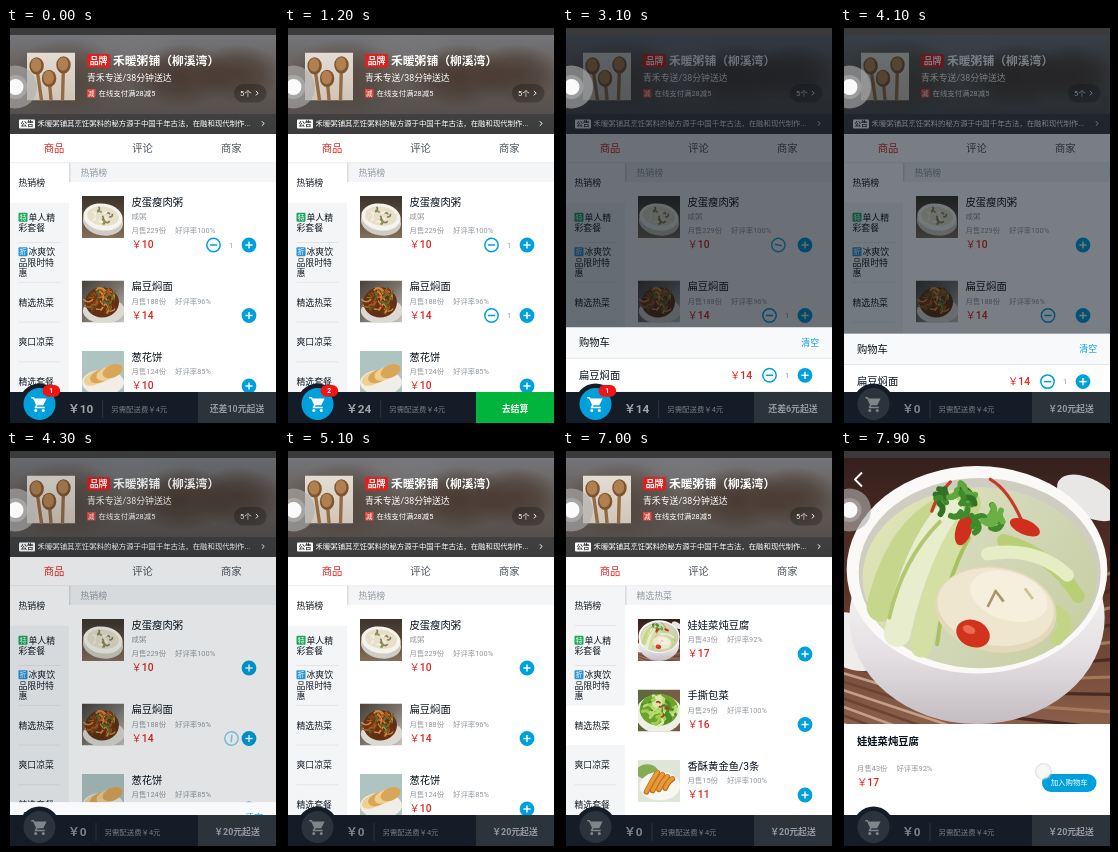
These frames come from a looping animation (272x395 px, 8000 ms). An HTML page with a canvas:

```html
<!DOCTYPE html>
<html lang="zh">
<head>
<meta charset="utf-8">
<title>点餐</title>
<style>
html, body { margin: 0; width: 100%; height: 100%; overflow: hidden; background: #000; }
canvas { display: block; width: 272px; height: 395px; }
</style>
</head>
<body>
<canvas id="stage"></canvas>
<script>
const W = 272, H = 395, LOOP = 8000;
const L = 4, R = 270, TOP = 7, LIST = 135, BAR = 364;
const BLUE = '#00a0dc', RED = '#e0241f', INK = '#07111b', GREY = '#93999f', PALE = '#f3f5f7';
const FONT = 'Roboto, "Noto Sans CJK SC", "Noto Sans CJK", sans-serif';

// Moments of each action, in ms
const ADD = 650, OPEN = 1650, REMOVE = 3000, CLOSE = 4050, CLEAR = 4095,
  SCROLL = 5555, DETAIL = 7200, TOUCH = 7900;

const canvas = document.getElementById('stage');
const dpr = window.devicePixelRatio || 1;
canvas.width = W * dpr;
canvas.height = H * dpr;
const c = canvas.getContext('2d');

const clamp = v => Math.max(0, Math.min(1, v));
const phase = (t, start, ms) => clamp((t - start) / ms);
const smooth = p => p * p * (3 - 2 * p);

function bezier(x1, y1, x2, y2) {
  const at = (a, b, u) => 3 * a * u * (1 - u) ** 2 + 3 * b * u * u * (1 - u) + u ** 3;
  return x => {
    let lo = 0, hi = 1;
    for (let i = 0; i < 24; i++) {
      const mid = (lo + hi) / 2;
      if (at(x1, x2, mid) < x) lo = mid; else hi = mid;
    }
    return at(y1, y2, lo);
  };
}
const ease = bezier(.25, .1, .25, 1);
const toss = bezier(.49, -.29, .75, .41);

// Drawing helpers
function rect(x, y, w, h, fill) { c.fillStyle = fill; c.fillRect(x, y, w, h); }
function pill(x, y, w, h, r, fill) {
  c.fillStyle = fill;
  c.beginPath(); c.roundRect(x, y, w, h, r); c.fill();
}
function oval(x, y, rx, ry, fill, turn = 0) {
  c.fillStyle = fill;
  c.beginPath(); c.ellipse(x, y, rx, ry, turn, 0, 7); c.fill();
}
const dot = (x, y, r, fill) => oval(x, y, r, r, fill);
function shade(x0, y0, x1, y1, ...colors) {
  const g = c.createLinearGradient(x0, y0, x1, y1);
  colors.forEach((color, i) => g.addColorStop(i / (colors.length - 1), color));
  return g;
}
// Soft round patch; rgb is "r,g,b"
function glow(x, y, rx, ry, rgb, alpha) {
  c.save();
  c.translate(x, y);
  c.scale(rx, ry);
  const g = c.createRadialGradient(0, 0, 0, 0, 0, 1);
  g.addColorStop(0, `rgba(${rgb},${alpha})`);
  g.addColorStop(.5, `rgba(${rgb},${alpha * .7})`);
  g.addColorStop(1, `rgba(${rgb},0)`);
  dot(0, 0, 1, g);
  c.restore();
}
function line(pts, color, width, cap = 'butt') {
  c.strokeStyle = color; c.lineWidth = width; c.lineCap = cap; c.lineJoin = 'round';
  c.beginPath();
  pts.forEach(([x, y]) => c.lineTo(x, y));
  c.stroke();
}
function curve(x0, y0, x1, y1, x2, y2, color, width) {
  c.strokeStyle = color; c.lineWidth = width; c.lineCap = 'round';
  c.beginPath(); c.moveTo(x0, y0); c.quadraticCurveTo(x1, y1, x2, y2); c.stroke();
}
// y is the visual middle; returns the width
function text(s, x, y, size, color, weight = 400, align = 'left') {
  c.font = `${weight} ${size}px ${FONT}`;
  c.textAlign = align;
  c.fillStyle = color;
  c.fillText(s, x, y + size * .37);
  return c.measureText(s).width;
}
function clipped(x, y, w, h, draw) {
  c.save();
  c.beginPath(); c.rect(x, y, w, h); c.clip();
  draw();
  c.restore();
}
function random(seed) {
  return () => (seed = (seed * 16807) % 2147483647) / 2147483647;
}

// Dish pictures, drawn in a 100 x 100 box
function strips(seed, n, colors, cx, cy, spread, len, width) {
  const rnd = random(seed);
  for (let i = 0; i < n; i++) {
    const a = rnd() * 6.28, d = Math.sqrt(rnd()) * spread;
    const x = cx + Math.cos(a) * d, y = cy + Math.sin(a) * d * .8;
    const b = rnd() * 3.14, dx = Math.cos(b) * len, dy = Math.sin(b) * len;
    curve(x - dx, y - dy, x + dy, y - dx, x + dx, y + dy, colors[i % colors.length], width);
  }
}
const pictures = {
  porridge() {
    rect(0, 0, 100, 100, shade(0, 0, 0, 100, '#3b342c', '#5d4b3b', '#84705a'));
    oval(50, 62, 48, 32, '#cfccc5', .15);
    oval(50, 50, 47, 32, '#f6f3ec', .15);
    oval(50, 48, 38, 23, '#e6dfca', .15);
    strips(5, 14, ['#8a7a55', '#f7f2df', '#7f9650'], 50, 47, 24, 4, 4);
  },
  noodles() {
    rect(0, 0, 100, 100, shade(0, 0, 100, 100, '#47413c', '#77716a', '#c9c5be'));
    oval(52, 72, 50, 30, '#dcd9d3');
    oval(48, 52, 40, 36, '#5f3014');
    strips(9, 44, ['#a8591f', '#d08a3a', '#7a3312', '#5c6a2c'], 48, 50, 34, 11, 3.5);
  },
  pancake() {
    rect(0, 0, 100, 100, '#aec4c0');
    oval(50, 75, 50, 30, '#f0eee6');
    for (let i = 0; i < 4; i++) oval(28 + i * 15, 66 - i * 6, 25, 15, i % 2 ? '#d9a658' : '#efcf92', -.4);
  },
  juice() {
    rect(0, 0, 100, 100, '#fdfcf9');
    pill(30, 22, 27, 64, 8, '#f09a1d');
    rect(35, 6, 17, 18, '#e7e3d8');
    rect(35, 22, 17, 8, '#d98314');
    dot(70, 76, 14, '#ee8b12');
    dot(86, 82, 11, '#f5a623');
    oval(56, 88, 12, 8, '#f7bd4a');
    oval(72, 60, 9, 3, '#7aa343', -.6);
  },
  cabbage() {
    rect(0, 0, 100, 100, shade(0, 0, 100, 0, '#5b6b3c', '#7d5a45'));
    oval(50, 58, 56, 46, '#eef0e6');
    oval(50, 48, 46, 38, '#6ba32c');
    strips(21, 40, ['#a0cf52', '#d8e9a8', '#4f8a26', '#b5dc72'], 50, 48, 37, 10, 7);
    strips(4, 4, ['#b3322a'], 50, 46, 26, 4, 4);
  },
  fish() {
    rect(0, 0, 100, 100, '#dfe5d8');
    oval(22, 28, 26, 18, '#86ab55');
    oval(52, 62, 48, 34, '#f8f7f2');
    for (let i = 0; i < 4; i++) {
      curve(20 + i * 15, 76 - i * 3, 32 + i * 13, 52, 46 + i * 12, 30 + i * 5, '#b96a1b', 13);
      curve(20 + i * 15, 75 - i * 3, 32 + i * 13, 51, 46 + i * 12, 29 + i * 5, '#e79a37', 9);
    }
  },
  tofu() {
    rect(0, 0, 100, 100, shade(0, 0, 0, 100, '#35201d', '#5c3327', '#8a5f4a'));
    for (let i = 0; i < 18; i++) {
      line([[50, 60 + i * 4], [110, 40 + i * 7]], i % 2 ? '#4a2a22' : '#a5785c', 1.2);
      line([[50, 80 + i * 4], [-10, 66 + i * 3]], i % 2 ? '#6b4434' : '#c3a08a', 1);
    }
    // Handles and body
    oval(92, 15, 13, 7, '#e9e6e6', .5);
    oval(3, 69, 14, 10, '#efecec', .5);
    oval(50, 60, 48, 40, shade(0, 50, 0, 100, '#f4f1f2', '#e3dfe2', '#c3bcc0'));
    // Rim and soup
    oval(50, 42, 49, 39, '#fbf9f8');
    oval(51, 43, 45.5, 35.5, '#cfcdc2');
    oval(51, 45, 44, 34, shade(15, 20, 85, 70, '#dfe5b4', '#d2d7b8', '#c9cfa4'));
    // Leaves
    curve(46, 17, 22, 22, 14, 56, '#c7d68d', 11);
    curve(40, 20, 27, 34, 20, 66, '#e8edcd', 10);
    curve(45, 26, 35, 40, 29, 71, '#d3dfa3', 8);
    curve(36, 24, 22, 38, 17, 60, '#b2c76f', 1.5);
    curve(47, 30, 38, 46, 35, 70, '#a9c15f', 1.5);
    curve(60, 31, 78, 36, 88, 52, '#b9cf76', 5);
    curve(54, 36, 72, 33, 84, 44, '#e6ecc4', 5);
    curve(80, 58, 86, 62, 80, 68, '#c3d584', 5);
    // Tofu
    oval(57, 57, 23, 16, '#e3d9ba', .15);
    oval(57, 56, 22, 14.5, '#efe6cf', .15);
    oval(62, 52, 15, 9, '#f6efdd', .3);
    line([[54, 56], [57, 50], [60, 54]], '#a99668', 1);
    line([[68, 49], [71, 53]], '#cdbf98', 1);
    // Garnish
    curve(40, 9, 35, 14, 33, 20, '#c73a26', 1.2);
    curve(55, 8, 62, 12, 67, 24, '#c73a26', 1.2);
    oval(45, 27, 3, 6, '#cf2f1c', .3);
    oval(68, 26, 6, 2.8, '#cf2f1c', .4);
    oval(48.5, 66, 6.5, 5, '#d2331d', .4);
    oval(47, 64.5, 2.5, 1.5, '#ea6a52', .4);
    strips(13, 16, ['#3f8a2c', '#5fa63d', '#2f7323'], 41, 16, 7, 2, 2.2);
    strips(17, 12, ['#3f8a2c', '#6bb045'], 54, 23, 6, 2, 2.2);
  },
  spoons() {
    rect(0, 0, 100, 100, shade(0, 0, 0, 100, '#e4ddd4', '#cfc5b8'));
    [[20, 28], [46, 54], [76, 26]].forEach(([x, y], i) => {
      line([[x, y], [x + 10 - i * 6, 98]], '#946a42', 7, 'round');
      oval(x, y, 15, 18, '#7f5530');
      oval(x - 1, y - 2, 11, 14, '#b08050');
    });
  }
};
function picture(kind, x, y, size) {
  clipped(x, y, size, size, () => {
    c.translate(x, y);
    c.scale(size / 100, size / 100);
    pictures[kind]();
  });
}

// Menu data: name, picture, sold, rating, price, extra
const groups = [
  ['热销榜', [
    ['皮蛋瘦肉粥', 'porridge', 229, 100, 10, { desc: '咸粥' }],
    ['扁豆焖面', 'noodles', 188, 96, 14],
    ['葱花饼', 'pancake', 124, 85, 10],
    ['牛肉馅饼', 'pancake', 114, 91, 14],
    ['猪肉锅贴', 'fish', 101, 78, 17],
    ['南瓜粥', 'porridge', 81, 91, 9],
    ['红豆薏米粥', 'porridge', 81, 86, 12],
    ['八宝酱菜', 'cabbage', 84, 100, 4],
    ['糊塌子', 'pancake', 80, 93, 10]]],
  ['单人精彩套餐', [['红枣山药粥套餐', 'porridge', 17, 100, 29]]],
  ['冰爽饮品限时特惠', [['VC无限橙果汁', 'juice', 15, 100, 8, { old: 10 }]]],
  ['精选热菜', [
    ['娃娃菜炖豆腐', 'tofu', 43, 92, 17],
    ['手撕包菜', 'cabbage', 29, 100, 16],
    ['香酥黄金鱼/3条', 'fish', 15, 100, 11]]]
];
const rowHeight = item => item[5] && item[5].desc ? 84.5 : 70.5;
const tops = [0];
groups.forEach(([, items], i) => {
  tops.push(tops[i] + 20.5 + items.reduce((sum, it) => sum + rowHeight(it), 0));
});

const menu = [['热销榜'], ['单人精', '彩套餐'], ['冰爽饮', '品限时特', '惠'], ['精选热菜'], ['爽口凉菜'], ['精选套餐']];
const tags = { 1: ['特', '#19a85b'], 2: ['折', '#2a94d6'] };

// Controls
function plus(x, y) {
  dot(x, y, 7.4, BLUE);
  line([[x - 3.6, y], [x + 3.6, y]], '#fff', 1.4);
  line([[x, y - 3.6], [x, y + 3.6]], '#fff', 1.4);
}
// p: 0 in place, 1 rolled away behind the plus
function minus(x, y, p = 0) {
  if (p >= 1) return;
  c.save();
  c.globalAlpha *= 1 - smooth(p);
  c.translate(x + 35 * p, y);
  c.rotate(Math.PI * smooth(smooth(p)));
  c.strokeStyle = BLUE; c.lineWidth = 1.5;
  c.beginPath(); c.arc(0, 0, 6.7, 0, 7); c.stroke();
  line([[-3.6, 0], [3.6, 0]], BLUE, 1.5);
  c.restore();
}
function stepper(y, hidden) {
  minus(207.5, y, hidden);
  if (hidden === 0) text('1', 225, y, 7.4, GREY, 400, 'center');
  plus(243, y);
}
function chevron(x, y, s, width) {
  line([[x - s / 2, y - s], [x + s / 2, y], [x - s / 2, y + s]], '#fff', width);
}
function stats(x, y, sold, rate) {
  const w = text(`月售${sold}份`, x, y, 7.4, GREY);
  text(`好评率${rate}%`, x + w + 8.9, y, 7.4, GREY);
}

function header() {
  clipped(L, TOP, R - L, 99, () => {
    rect(L, TOP, R - L, 99, shade(0, TOP, 0, 106, '#74757a', '#68625e', '#5a5451', '#4e4a49'));
    glow(60, 50, 60, 40, '74,58,46', .6);
    glow(175, 48, 55, 32, '64,46,36', .75);
    glow(232, 46, 45, 30, '64,46,36', .7);
    glow(125, 18, 50, 18, '125,125,128', .5);
  });
  picture('spoons', 21, 24.5, 48);
  pill(81, 26, 23, 13.5, 1.5, '#e0201c');
  text('品牌', 92.5, 32.8, 8.9, '#fff', 700, 'center');
  text('禾暖粥铺（柳溪湾）', 107, 32.5, 11.8, '#fff', 700);
  text('青禾专送/38分钟送达', 81, 49.5, 8.9, '#fff');
  rect(81, 61, 8.5, 8.5, '#d9483f');
  text('减', 85.2, 65.2, 6.4, '#fff', 400, 'center');
  text('在线支付满28减5', 92.5, 65.2, 7.4, '#fff');
  pill(228, 56, 32.5, 18.5, 9.2, 'rgba(0,0,0,.25)');
  text('5个', 234, 65.2, 7.4, '#fff');
  chevron(251, 65.2, 2.2, 1);
  rect(L, 86, R - L, 20, 'rgba(7,17,27,.25)');
  pill(13, 91.5, 16, 9, 1, '#fff');
  text('公告', 21, 96, 6.6, '#333', 700, 'center');
  text('禾暖粥铺其烹饪粥料的秘方源于中国千年古法，在融和现代制作...', 31.5, 95.5, 7.4, '#fff');
  chevron(257, 95.5, 2.2, 1);
}

function tabs() {
  rect(L, 106, R - L, 29, '#fff');
  ['商品', '评论', '商家'].forEach((s, i) => {
    text(s, 48 + i * 88.6, 120.5, 10.3, i ? '#4d555d' : RED, 400, 'center');
  });
  rect(L, 134.4, R - L, .7, 'rgba(7,17,27,.1)');
}

function sidebar(scroll) {
  let current = 0;
  while (current < 3 && scroll >= tops[current + 1] - .5) current++;
  rect(L, LIST, 59, BAR - LIST, PALE);
  menu.forEach((lines, i) => {
    const y = LIST + i * 39.8, mid = y + 19.9;
    if (i === current) rect(L, y, 59, 39.8, '#fff');
    else if (i + 1 !== current) rect(12.5, y + 39.3, 42, .7, 'rgba(7,17,27,.1)');
    lines.forEach((s, k) => {
      const ly = mid + (k - (lines.length - 1) / 2) * 10.35;
      let x = 12.5;
      if (!k && tags[i]) {
        pill(x, ly - 4.8, 9, 9, 1, tags[i][1]);
        text(tags[i][0], x + 4.5, ly - .3, 7, '#fff', 500, 'center');
        x += 10;
      }
      text(s, x, ly, 8.9, '#141c24');
    });
  });
}

function dish(item, y, hidden) {
  const [name, kind, sold, rate, price, extra = {}] = item;
  const shift = extra.desc ? 14 : 0;
  picture(kind, 76, y - 6, 42);
  text(name, 125.5, y, 10.3, INK);
  if (extra.desc) text(extra.desc, 125.5, y + 14.5, 7.4, GREY);
  stats(125.5, y + 14.5 + shift, sold, rate);
  const w = text('￥' + price, 125.5, y + 28.5 + shift, 10.3, RED, 500);
  if (extra.old) {
    const ow = text('￥' + extra.old, 125.5 + w + 4, y + 29 + shift, 7.4, GREY);
    rect(125.5 + w + 5, y + 29 + shift, ow - 1, .8, GREY);
  }
  stepper(y + 29 + shift, hidden);
}

function list(t, scroll) {
  rect(63, LIST, R - 63, BAR - LIST, '#fff');
  groups.forEach(([title, items], gi) => {
    let y = LIST + tops[gi] - scroll;
    rect(63, y, R - 63, 19, PALE);
    rect(63, y, 1.5, 19, '#d9dde1');
    text(title, 74.5, y + 10, 8.9, GREY);
    y += 19;
    items.forEach((item, i) => {
      let hidden = 1;
      if (gi === 0 && i === 0) hidden = phase(t, REMOVE, 400);
      if (gi === 0 && i === 1) hidden = t < CLEAR ? 1 - phase(t, ADD, 400) : phase(t, CLEAR, 400);
      if (y > 30 && y < BAR) dish(item, y + 20, hidden);
      y += rowHeight(item);
    });
  });
}

function sheet(t) {
  const open = ease(phase(t, OPEN, 500)) * (1 - ease(phase(t, CLOSE, 500)));
  if (open <= 0) return;
  rect(L, TOP, R - L, BAR - TOP, `rgba(7,17,27,${.6 * open})`);
  const rows = groups[0][1].slice(t < REMOVE ? 0 : 1, 2);
  const height = 31 + rows.length * 33.5;
  const y = BAR - height * open;
  clipped(L, TOP, R - L, BAR - TOP, () => {
    rect(L, y, R - L, height, '#fff');
    rect(L, y, R - L, 31, '#f7f9fa');
    rect(L, y + 30.4, R - L, .7, 'rgba(7,17,27,.12)');
    text('购物车', 17, y + 15, 10.3, INK);
    text('清空', 257, y + 15, 8.9, BLUE, 400, 'right');
    rows.forEach((item, i) => {
      const mid = y + 47.8 + i * 33.5;
      text(item[0], 17, mid, 10.3, INK);
      text('￥' + item[4], 190, mid, 10.3, RED, 500, 'right');
      stepper(mid, 0);
      rect(17, mid + 16.2, 240, .6, 'rgba(7,17,27,.1)');
    });
  });
}

function detail(t) {
  const p = phase(t, DETAIL, 250);
  if (p <= 0) return;
  clipped(L, TOP, R - L, BAR - TOP, () => {
    c.translate((R - L) * (1 - p), 0);
    rect(L, TOP, R - L, BAR - TOP, '#fff');
    picture('tofu', L, TOP, 266);
    line([[22, 21.5], [15, 28.5], [22, 35.5]], '#fff', 1.8);
    text('娃娃菜炖豆腐', 17, 290.5, 10.3, INK, 700);
    stats(17, 317.5, 43, 92);
    text('￥17', 17, 331.5, 10.3, RED, 500);
    pill(202, 323, 54.5, 18, 9, BLUE);
    text('加入购物车', 229.2, 331.7, 7.4, '#fff', 400, 'center');
    if (t >= TOUCH) {
      dot(203.5, 320.5, 8.5, 'rgba(200,204,206,.5)');
      dot(203.5, 320.5, 7, 'rgba(250,250,250,.85)');
    }
  });
}

function cartIcon(x, y, color) {
  c.save();
  c.translate(x - 9, y - 9);
  c.scale(.75, .75);
  line([[1, 3], [4, 3], [8.5, 12.5], [6.5, 16], [19, 16]], color, 2);
  c.fillStyle = color;
  c.beginPath();
  [[5, 4], [21.5, 4], [17, 13], [8.5, 13]].forEach(([px, py]) => c.lineTo(px, py));
  c.fill();
  dot(7, 20, 2, color);
  dot(17, 20, 2, color);
  c.restore();
}

function bar(t) {
  const items = [t < REMOVE, t >= ADD && t < CLEAR];
  const count = items[0] + items[1];
  const total = items[0] * 10 + items[1] * 14;
  rect(L, BAR, R - L, H - BAR, '#141d27');
  dot(33.5, 376, 20.5, '#141d27');
  dot(33.5, 376, 16, count ? BLUE : '#2b343c');
  cartIcon(33.5, 376.5, count ? '#fff' : '#80858a');
  if (count) {
    pill(36.5, 357, 17.7, 11.8, 5.9, '#f01414');
    text(count, 45.3, 362.8, 6.8, '#fff', 700, 'center');
  }
  const w = text('￥' + total, 62, 381, 11.8, `rgba(255,255,255,${count ? .6 : .45})`, 700);
  const x = 62 + w + 9;
  rect(x, 372, .8, 18, 'rgba(255,255,255,.13)');
  text('另需配送费￥4元', x + 9, 381, 7.4, 'rgba(255,255,255,.42)');
  const ready = total >= 20;
  const label = ready ? '去结算' : total ? `还差${20 - total}元起送` : '￥20元起送';
  rect(192, BAR, R - 192, H - BAR, ready ? '#00b43c' : '#2b333b');
  text(label, 231, 381, 8.9, ready ? '#fff' : 'rgba(255,255,255,.5)', 700, 'center');
}

function ball(t) {
  const p = phase(t, ADD, 400);
  if (p <= 0 || p >= 1) return;
  dot(243 - 209.5 * p, 288 + 88 * toss(p), 6, BLUE);
}

function floatButton() {
  clipped(L, 0, R - L, H, () => {
    dot(9.5, 59, 21.5, 'rgba(175,175,175,.62)');
    dot(9.5, 59, 12, 'rgba(215,215,215,.35)');
    dot(9.5, 59, 8, 'rgba(255,255,255,.95)');
  });
}

function draw(t) {
  const scroll = tops[3] * (1 - (1 - phase(t, SCROLL, 300)) ** 4);
  c.setTransform(dpr, 0, 0, dpr, 0, 0);
  rect(0, 0, W, H, '#000');
  clipped(L, LIST, R - L, BAR - LIST, () => {
    list(t, scroll);
    sidebar(scroll);
  });
  header();
  tabs();
  sheet(t);
  detail(t);
  rect(L, 0, R - L, TOP, '#3a3a3a');
  bar(t);
  ball(t);
  floatButton();
}

const start = performance.now();
function tick() {
  draw((performance.now() - start) % LOOP);
  requestAnimationFrame(tick);
}
tick();
</script>
</body>
</html>
```
